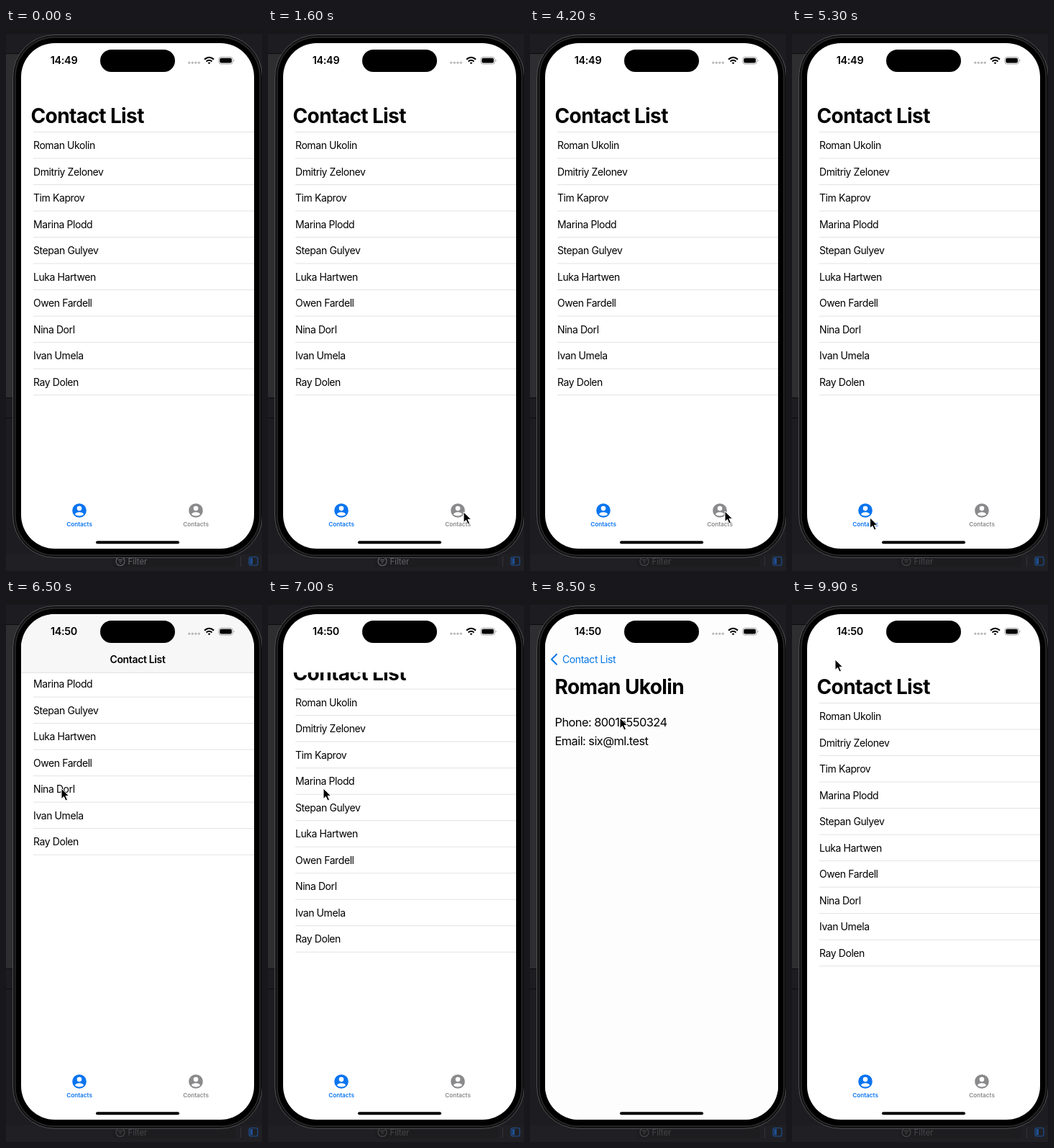
Recreate the animation shown at these times as an HTML page. Size 356 by 754 pixels, loop 10000 ms.

```html
<!DOCTYPE html>
<html lang="en">
<head>
<meta charset="utf-8">
<title>Contact List</title>
<style>
  html, body { margin: 0; width: 100%; height: 100%; overflow: hidden; background: #1d1d21; }
  svg { display: block; font-family: Inter, Roboto, sans-serif; }
  .row { font-size: 14px; letter-spacing: -.03em; }
  .large { font-size: 28px; font-weight: 700; letter-spacing: -.022em; }
  .head { font-size: 12.4px; font-weight: 600; letter-spacing: -.02em; fill: #85858a; }
  .inline { font-size: 14px; font-weight: 600; letter-spacing: -.025em; text-anchor: middle; }
  .info { font-size: 16.4px; letter-spacing: -.034em; }
  .tab { font-size: 8.2px; font-weight: 600; letter-spacing: 0; text-anchor: middle; }
  .clock { font-size: 14.4px; font-weight: 600; letter-spacing: -.02em; text-anchor: middle; }
  .line { stroke: #dfdfe1; stroke-width: .9; }
  .icon { fill: none; stroke: #0a78e6; stroke-width: 1.35; stroke-linejoin: round; stroke-linecap: round; }
</style>
</head>
<body>
<svg width="356" height="754" viewBox="0 0 356 754">
  <defs>
    <clipPath id="screen"><rect x="21" y="21" width="324" height="702" rx="47"/></clipPath>
    <clipPath id="content"><rect x="21" y="102" width="424" height="621"/></clipPath>
    <g id="person">
      <circle r="9.8"/>
      <circle cy="-2.9" r="3.3" fill="#fff"/>
      <path d="M-6.1 5.2C-5 1.2 5 1.2 6.1 5.2C3 8.2-3 8.2-6.1 5.2Z" fill="#fff"/>
    </g>
    <path id="phone" d="M-7.5-6.5C-6-9-4.5-9.5-3.5-8L-1.5-5C-.8-4-1-3-2-2C-2.8-1.2-1 1 0 2C1.2 3 2.5 3.8 3.2 3C4 2 5 1.6 6 2.2L8.5 4C9.8 5 9.3 6.5 7 8.2C4 10-1 7.5-4.5 4C-8 .5-10-3.5-7.5-6.5Z"/>
    <path id="tray" d="M-10 .5L-7.2-5.2Q-6.6-6.4-5.4-6.4H5.4Q6.6-6.4 7.2-5.2L10 .5V4.6Q10 6.6 8 6.6H-8Q-10 6.6-10 4.6ZH-3.7Q-3.2 3.4 0 3.4T3.7 .5H10"/>
  </defs>

  <!-- desktop behind the device -->
  <rect width="356" height="754" fill="#1d1d21"/>
  <rect width="356" height="8" fill="#17171a"/>
  <rect y="35" width="30" height="478" fill="#2e2e30"/>
  <path d="M0 35.5H30M0 513.5H30M0 541.5H30" stroke="#0c0c0e"/>
  <rect y="731" width="356" height="23" fill="#202024"/>
  <rect x="148" y="732" width="172" height="17" rx="5" fill="#1d1d20"/>
  <g id="filter">
    <circle cx="159" cy="740.5" r="6" fill="none" stroke="currentColor" stroke-width="1.1"/>
    <path d="M155.8 738.5H162.2M157 740.8H161M158.2 743H159.8" stroke="currentColor" stroke-width="1.1"/>
    <text x="169.5" y="744.7" font-size="11.3" fill="currentColor">Filter</text>
  </g>
  <path d="M326.5 734V748" stroke="#343438"/>
  <rect x="338" y="734.5" width="12" height="11.5" rx="2.5" fill="none" stroke="#1f4f92" stroke-width="1.2"/>
  <rect x="339.5" y="736" width="3.5" height="8.5" fill="#1f4f92"/>

  <!-- device -->
  <rect x="9.5" y="9.5" width="347" height="726" rx="58.5" fill="#111112" stroke="#505053"/>
  <rect x="13" y="13" width="340" height="719" rx="55" fill="#000" stroke="#2c2c2e" stroke-width="1.4"/>
  <g clip-path="url(#screen)">
    <rect x="21" y="21" width="324" height="702" fill="#fff"/>
    <g id="under">
      <g clip-path="url(#content)">
        <g id="names"></g>
        <g id="sections"></g>
      </g>
      <g id="navBar">
        <rect x="21" y="21" width="324" height="81" fill="#f7f7f8"/>
        <path class="line" d="M21 102.4H345"/>
        <text class="inline" x="183" y="88.6">Contact List</text>
      </g>
      <g id="tabFill">
        <rect x="21" y="654" width="324" height="69" fill="#f4f4f5"/>
        <path class="line" d="M21 654.4H345"/>
      </g>
      <g id="tabLeft"><use href="#person" x="102" y="670"/><text class="tab" x="102" y="691.7">Contacts</text></g>
      <g id="tabRight"><use href="#person" x="264" y="670"/><text class="tab" x="264" y="691.7">Contacts</text></g>
      <rect id="dim" x="21" y="21" width="424" height="702"/>
    </g>
    <g id="detail">
      <rect x="21" y="21" width="324" height="702" fill="#fdfdfd"/>
    </g>
    <g clip-path="url(#content)"><text id="title" class="large">Contact List</text></g>
    <text id="backText" class="row" fill="#0a78e6">Contact List</text>
    <path id="chevron" d="M37 76.8L30 83.8L37 90.8" fill="none" stroke="#0a78e6" stroke-width="2" stroke-linecap="round" stroke-linejoin="round"/>
    <rect id="thumb" x="340" y="109" width="2.6" height="286" rx="1.3" fill="#8b8b8d"/>
    <!-- status bar -->
    <text id="clock" class="clock" x="80.5" y="50.2">14:49</text>
    <g id="dots" fill="#b9b9bb"></g>
    <g fill="none" stroke="#000" stroke-width="2.1">
      <path d="M276 43.6Q282.5 37.9 289 43.6M278.5 46.5Q282.5 43 286.5 46.5"/>
      <path d="M280.6 48.2Q282.5 46.8 284.4 48.2L282.5 50.2Z" fill="#000" stroke="none"/>
    </g>
    <rect x="295.9" y="40.4" width="19.4" height="9.6" rx="3" fill="none" stroke="#9b9b9d" stroke-width=".9"/>
    <rect x="297.3" y="41.8" width="16.6" height="6.8" rx="1.8"/>
    <path d="M316.6 43.6Q318.6 45.2 316.6 46.8Z" fill="#9b9b9d"/>
    <rect x="131" y="30" width="104" height="31" rx="15.5"/>
    <rect x="125" y="712.2" width="116" height="4" rx="2"/>
  </g>
  <path id="cursor" d="M0 0V14.6L3.4 11.4L5.9 17L8.5 15.9L6 10.4H10.6Z" fill="#000" stroke="#fff" stroke-width="1" stroke-linejoin="round"/>
</svg>
<script>
const LOOP = 10000, STEP = 100, WIDTH = 324;
const BLUE = '#0a74f0', GRAY = '#8a8a8c';
const people = ['Roman Ukolin', 'Dmitriy Zelonev', 'Tim Kaprov', 'Marina Plodd', 'Stepan Gulyev',
  'Luka Hartwen', 'Owen Fardell', 'Nina Dorl', 'Ivan Umela', 'Ray Dolen'];
const phones = ['80015550324', '80015550654', '80015550485', '80015550000'];
const mails = ['six@ml.test', 'seven@ml.test', 'five@ml.test', 'zero@ml.test'];

// cursor path: time, x, y
const path = [[700, 197, 616], [1500, 272, 672], [2000, 272, 672], [2700, 105, 674], [3100, 105, 674],
  [3800, 270, 670], [4100, 271, 671], [4600, 271, 671], [5200, 108.5, 680], [5400, 108.5, 680],
  [5700, 100, 530], [5900, 100, 530], [6500, 77, 263], [7100, 77, 263], [7700, 125, 165],
  [8600, 125, 165], [9100, 60, 84], [LOOP, 60, 84]];

const $ = id => document.getElementById(id);
const clamp = v => Math.max(0, Math.min(1, v));
const smooth = v => v * v * (3 - 2 * v);

function add(parent, tag, attrs, text) {
  const el = document.createElementNS('http://www.w3.org/2000/svg', tag);
  for (const key in attrs) el.setAttribute(key, attrs[key]);
  if (text) el.textContent = text;
  return parent.appendChild(el);
}
const label = (parent, cls, x, y, text) => add(parent, 'text', { class: cls, x, y }, text);
const rule = (parent, x, y) => add(parent, 'path', { class: 'line', d: `M${x} ${y}H345` });
const icon = (parent, name, y) => add(parent, 'use', { href: '#' + name, class: 'icon', x: 47.5, y });

rule($('names'), 38, 144.5);
people.forEach((name, i) => {
  const y = 144.5 + i * 36.52;
  label($('names'), 'row', 38, y + 23.6, name);
  rule($('names'), 38, y + 36.52);
});

people.slice(0, 5).forEach((name, i) => {
  const y = 174 + i * 114.25, box = $('sections');
  label(box, 'head', 38, y + 4.6, name);
  rule(box, 71, y + 11.8);
  icon(box, 'phone', y + 30);
  if (!phones[i]) return;
  label(box, 'row', 71, y + 35, phones[i]);
  rule(box, 71, y + 48.3);
  icon(box, 'tray', y + 66.5);
  label(box, 'row', 71, y + 71.6, mails[i]);
  rule(box, 71, y + 84.8);
});

label($('detail'), 'large', 34.5, 132, people[0]);
label($('detail'), 'info', 34.5, 177, 'Phone: ' + phones[0]);
label($('detail'), 'info', 34.5, 203.3, 'Email: ' + mails[0]);
for (let i = 0; i < 4; i++) add($('dots'), 'circle', { cx: 254.8 + i * 4.5, cy: 48.2, r: 1.6 });

function cursorAt(t) {
  const i = path.findIndex(k => k[0] > t);
  if (i < 1) return path[0].slice(1);
  const [a, b] = [path[i - 1], path[i]];
  const k = smooth((t - a[0]) / (b[0] - a[0]));
  return [1, 2].map(n => a[n] + (b[n] - a[n]) * k);
}

// follows the pointer while the title collapses, then resists at half speed
function scrollAt(t, y) {
  if (t < 5900 || t > 7400) return 0;
  const drag = 530 - y;
  const held = drag < 42 ? drag : 42 + (drag - 42) / 2;
  if (t <= 6700) return held;
  const s = (t - 6700) / 1000 * 12;
  return (42 + (530 - 263 - 42) / 2) * (1 + s) * Math.exp(-s);
}

function spring(ms) {
  if (ms <= 0) return 0;
  if (ms >= 520) return 1;
  const s = ms * .014;
  return 1 - (1 + s) * Math.exp(-s);
}

const set = (id, name, value) => $(id).setAttribute(name, value);
const show = (id, on) => set(id, 'opacity', +on);
const move = (id, x, y, scale = 1) => set(id, 'transform', `translate(${x} ${y}) scale(${scale})`);

function draw(t) {
  const [x, y] = cursorAt(t);
  const scroll = scrollAt(t, y);
  const second = (t >= 1800 && t < 2900) || (t >= 4400 && t < 5200);
  const push = spring(t - 7977) - spring(t - 9250);

  move('cursor', x, y);
  show('cursor', t >= 700);
  set('filter', 'color', t < 1800 ? '#66666a' : '#47474a');
  $('clock').textContent = t < 6000 ? '14:49' : '14:50';

  show('names', !second);
  show('sections', second);
  show('tabFill', second);
  show('thumb', second);
  set('tabLeft', 'fill', second ? GRAY : BLUE);
  set('tabRight', 'fill', second ? BLUE : GRAY);

  move('names', 0, -scroll);
  show('navBar', clamp((scroll - 30) / 14));

  move('under', -.3 * WIDTH * push, 0);
  set('dim', 'opacity', .1 * push);
  move('detail', WIDTH * (1 - push), 0);
  show('detail', push > 0);

  // the large title shrinks into the back button
  const tx = 34.5 + 10.5 * push, ty = 132 - 43.2 * push - scroll;
  move('title', tx, ty, 1 - push / 2);
  show('title', clamp(1 - push * 2));
  move('backText', tx, ty, 2 - push);
  show('backText', clamp(push * 2 - 1));
  show('chevron', clamp(push * 2 - 1));
}

const start = performance.now();
function tick() {
  const t = (performance.now() - start) % LOOP;
  draw(Math.floor(t / STEP) * STEP);
  requestAnimationFrame(tick);
}
tick();
</script>
</body>
</html>
```
